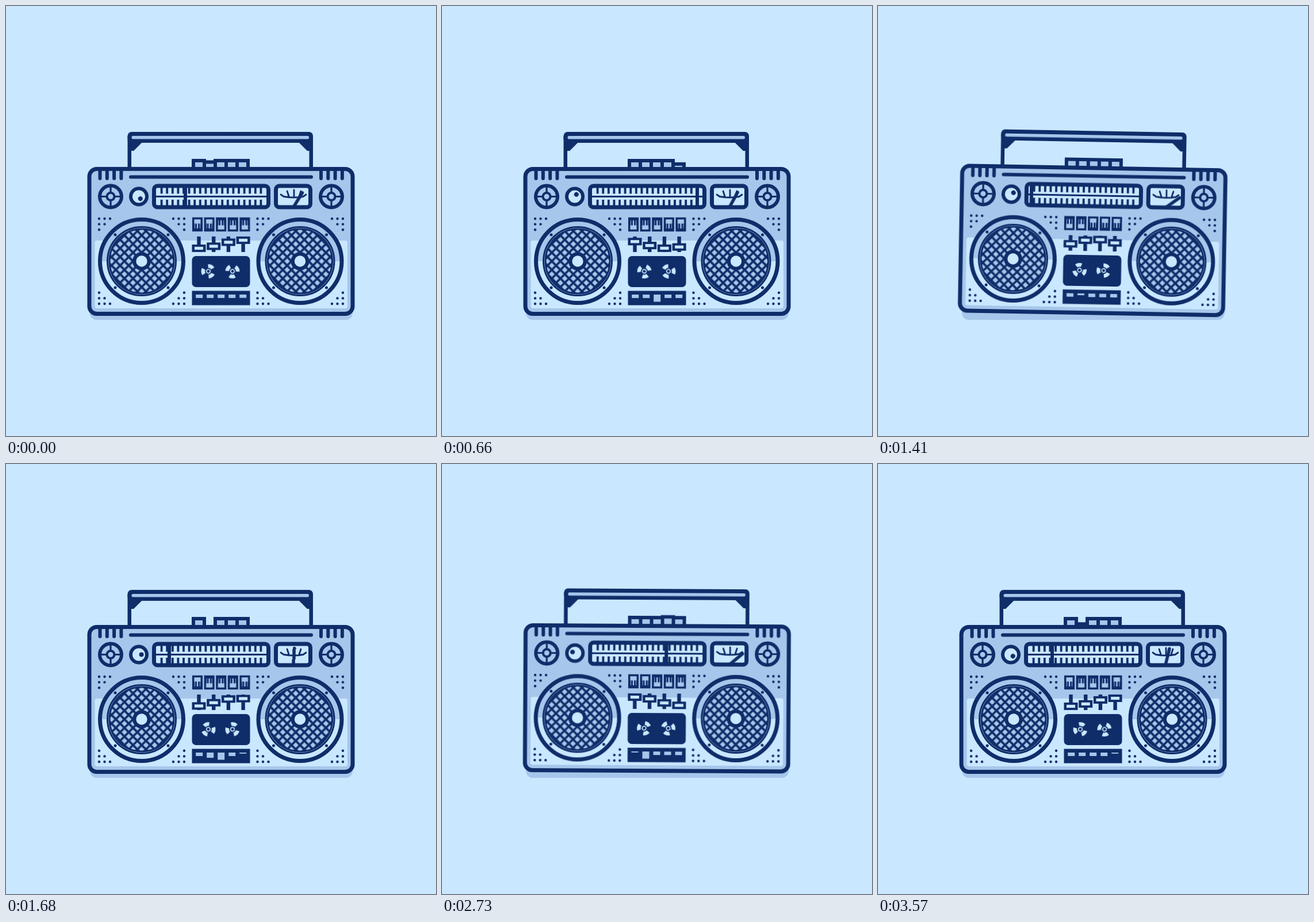
Animation of 748 by 748 pixels, one loop 3600 ms. Source, as an HTML page:

```html
<!DOCTYPE html>
<html lang="en">
<head>
<meta charset="utf-8">
<title>Boombox</title>
<style>
  html, body { margin: 0; width: 100%; height: 100%; overflow: hidden; background: #c9e7ff; }
  svg { display: block; width: 100vw; height: 100vh; }
  .dark { fill: #0f2d69; }
  .mid { fill: #a6c6eb; }
  .light { fill: #c9e7ff; }
  .line { stroke: #0f2d69; stroke-linecap: butt; }
  .none { fill: none; }
  .round { stroke-linecap: round; stroke-linejoin: round; }

  #box { transform-origin: 374px 378px; animation: wobble 450ms linear infinite; }
  @keyframes wobble {
    0%, 46.67%, 100% { transform: none; }
    6.67% { transform: translateY(-1.8px) rotate(.28deg); }
    16.67% { transform: translateY(-1.6px) rotate(1.35deg); }
    26.67% { transform: translateY(-1.6px) rotate(0deg); }
    36% { transform: translateY(-1.6px) rotate(-1.4deg); }
    40% { transform: translateY(-1.6px) rotate(-1.05deg); }
  }

  #meter { transform-origin: 500px 350px; animation: meter 450ms linear infinite; }
  @keyframes meter {
    0%, 100% { transform: rotate(31deg); }
    6.67% { transform: rotate(50deg); }
    14% { transform: rotate(54deg); }
    40% { transform: rotate(32deg); }
    46.67% { transform: rotate(29deg); }
    73.33% { transform: rotate(3deg); }
    93.33% { transform: rotate(13deg); }
  }

  .reel { animation: spin 900ms linear infinite; }
  @keyframes spin { to { transform: rotate(360deg); } }

  .comb { animation: flip 900ms step-end infinite; }
  @keyframes flip {
    0% { transform: none; }
    50%, 100% { transform: scaleY(-1); }
  }
</style>
</head>
<body>
<svg id="stage" viewBox="0 0 748 748" xmlns="http://www.w3.org/2000/svg">
  <defs>
    <pattern id="mesh" x="-5.3" y="-5.3" width="10.6" height="10.6" patternUnits="userSpaceOnUse" patternTransform="rotate(45)">
      <rect class="mid" width="10.6" height="10.6"/>
      <path class="line none" d="M0 5.3H10.6M5.3 0V10.6" stroke-width="3.7"/>
    </pattern>
    <clipPath id="meterClip"><rect x="471" y="314" width="57" height="35"/></clipPath>
  </defs>
  <rect class="mid" x="146" y="500" width="457" height="46" rx="12"/>
  <g id="box"></g>
</svg>
<script>
const LOOP = 3600;
const box = document.getElementById('box');

function add(tag, attrs, parent = box) {
  const el = document.createElementNS('http://www.w3.org/2000/svg', tag);
  for (const k in attrs) el.setAttribute(k, attrs[k]);
  return parent.appendChild(el);
}
const rect = (cls, x, y, width, height, rx = 0, w = 0, parent) =>
  add('rect', { class: cls, x, y, width, height, rx, 'stroke-width': w }, parent);
const disc = (cls, cx, cy, r, w = 0, parent) =>
  add('circle', { class: cls, cx, cy, r, 'stroke-width': w }, parent);
const path = (cls, d, w = 0, parent) =>
  add('path', { class: cls, d, 'stroke-width': w }, parent);
const group = (x, y, parent) => add('g', { transform: `translate(${x} ${y})` }, parent);
const times = (n, f) => Array.from({ length: n }, (_, i) => f(i));

// Parts behind the cabinet
const buttons = times(5, i => rect('mid line', 326 + 19 * i, 269, 19, 30, 0, 6));

path('dark', 'M211.5 226H218V286H211.5ZM527.5 226H534V286H527.5Z');
path('dark', 'M217 237H237L222 252H217ZM528.5 237H509L524 252H528.5Z');
rect('dark', 211.5, 219, 322.5, 19, 7);
rect('mid', 218.5, 226, 308.5, 5.5, 2.5);

// Cabinet
rect('mid', 145, 283.5, 458, 252, 13);
rect('light', 154.5, 408, 439.5, 118, 4);
rect('none line', 145, 283.5, 458, 252, 13, 7);
path('none line round', 'M217 297.5H531', 6);
for (const x of [163.5, 548]) {
  times(4, i => path('none line round', `M${x + 12.3 * i} 285V300`, 6));
}

// Corner dots; sx and sy point away from the corner
function dots(x, y, sx, sy) {
  for (let r = 0; r < 3; r++)
    for (let c = 0; c < 3 - r; c++)
      disc('dark', x + sx * c * 9.5, y + sy * r * 9.6, 2.2);
}
for (const [x, sx] of [[162, 1], [310, -1], [437.5, 1], [586, -1]]) {
  dots(x, 370, sx, 1);
  dots(x, 518, sx, -1);
}

function speaker(x) {
  const g = group(x, 444);
  disc('light', 0, 0, 72, 0, g);
  path('mid', 'M-72 0A72 72 0 0 1 72 0Z', 0, g);
  disc('none line', 0, 0, 72.5, 7, g);
  disc('mid line', 0, 0, 59.5, 3, g);
  add('circle', { r: 56, fill: 'url(#mesh)', class: 'line', 'stroke-width': 3 }, g);
  disc('dark', 0, 0, 16, 0, g);
  disc('light', 0, 0, 9.7, 0, g);
  for (const a of [-46, 46]) for (const b of [-46, 46]) disc('dark', a, b, 2.5, 0, g);
}
// The mesh has a crossing at the centre of each speaker
document.getElementById('mesh').setAttribute('patternTransform', 'rotate(45)');
[236, 511.5].forEach(speaker);

function dial(x) {
  const g = group(x, 331.5);
  disc('mid line', 0, 0, 19, 6, g);
  path('none line', 'M-18 0H18M0 -18V18', 3.2, g);
  disc('mid line', 0, 0, 6.5, 4, g);
}
[182, 566].forEach(dial);

const knob = group(231, 331.5);
disc('light line', 0, 0, 14, 6, knob);
const knobDot = disc('dark', 4.6, 0, 4, 0, knob);

// Tuner
rect('light line', 257.5, 313, 199, 37, 6, 7);
path('none line', 'M260 331.5H455', 3);
times(19, i => path('none line', `M${270.6 + 9.6 * i} 315V326.5m0 10.5V348`, 3.8));
const needle = rect('dark', -3, 314, 6, 35);

// Level meter
rect('light line', 469.5, 313, 60, 37, 6, 7);
path('none line round',
  'M478 328L483 331.5Q501 334.5 517 331.5L522 328M489 322L492 331M501 320V331M513 322L510 331', 2.8);
const meterBox = add('g', { 'clip-path': 'url(#meterClip)' });
const meter = path('none line round', 'M500 350V320.5', 5.5, meterBox);
meter.id = 'meter';

// Switches
times(5, i => {
  const g = group(333 + 20.6 * i, 380);
  rect('none line', -7.3, -10.5, 14.6, 21, 0, 3.5, g);
  const comb = path('none line', 'M-6 8.5H6M-2.6 9V-1.5M2.6 9V-1.5M-6.5 9V-1.5M6.5 9V-1.5', 3, g);
  comb.classList.add('comb');
  comb.style.animationDelay = `${150 * i - 1050}ms`;
});

// Sliders
const sliders = times(4, i => {
  const g = group(335.5 + 25.7 * i, 0);
  rect('dark', -3.2, 401, 6.4, 27, 0, 0, g);
  const cap = add('g', {}, g);
  rect('dark', -12, -6.5, 24, 13, 0, 0, cap);
  rect('light', -7.5, -2.6, 15, 5.2, 0, 0, cap);
  return cap;
});

// Cassette
rect('dark', 323.5, 435, 101, 54, 7);
for (const [x, angle] of [[352, 27], [394, 63]]) {
  const base = add('g', { transform: `translate(${x} 461.5) rotate(${angle})` });
  const reel = add('g', { class: 'reel' }, base);
  times(3, i => add('path', {
    class: 'light', d: 'M0 0L-6.2 -10.8A12.5 12.5 0 0 1 6.2 -10.8Z', transform: `rotate(${120 * i})`
  }, reel));
  disc('light line', 0, 0, 5, 2, reel);
  disc('dark', 0, 0, 2.4, 0, reel);
}

// Transport keys
rect('dark', 323.5, 495.5, 101, 25);
const keys = times(5, i => rect('mid', 330.2 + 19 * i, 502, 12, 6));

const buttonPresses = [
  [1, 90, 390], [5, 638, 840], [3, 990, 1290], [2, 1440, 1740],
  [4, 1890, 2190], [4, 2340, 2640], [1, 2790, 3090], [2, 3240, 3540]
];
const keyPresses = [
  [1, 120, 260], [4, 330, 470], [3, 560, 700], [1, 800, 900], [5, 1000, 1120],
  [2, 1220, 1340], [5, 1480, 1620], [3, 1580, 1800], [2, 1652, 1860], [5, 2060, 2200],
  [1, 2400, 2670], [2, 2640, 2840], [4, 2980, 3120], [5, 3380, 3510]
];
const tuning = [
  [0, 312], [330, 435], [530, 449], [660, 444], [930, 390],
  [1080, 312], [1380, 267], [1680, 284], [1770, 303]
];

// Piecewise linear value through [time, value] points
function ramp(t, pts) {
  let i = 1;
  while (i < pts.length - 1 && t > pts[i][0]) i++;
  const [a, va] = pts[i - 1], [b, vb] = pts[i];
  return va + (vb - va) * Math.min(1, Math.max(0, (t - a) / (b - a)));
}

// Sum of all presses of one part: down, hold, and release past rest
function pressed(list, id, t, depth, over, back) {
  let sum = 0;
  for (const [n, from, to] of list) {
    if (n !== id) continue;
    const x = (t - from + LOOP) % LOOP, len = to - from;
    sum += ramp(x, [[0, 0], [60, depth], [len, depth], [len + back, -over], [len + back + 32, 0]]);
  }
  return sum;
}

// Smooth periodic curve through points
function curve(t, pts, period) {
  const n = pts.length;
  const at = i => {
    const k = ((i % n) + n) % n;
    return [pts[k][0] + period * Math.floor(i / n), pts[k][1]];
  };
  let i = 0;
  while (i < n - 1 && t >= pts[i + 1][0]) i++;
  const slope = j => (at(j + 1)[1] - at(j - 1)[1]) / (at(j + 1)[0] - at(j - 1)[0]);
  const [a, va] = at(i), [b, vb] = at(i + 1), h = b - a, u = (t - a) / h;
  return va * (1 + 2 * u) * (1 - u) ** 2 + slope(i) * h * u * (1 - u) ** 2
    + vb * u * u * (3 - 2 * u) + slope(i + 1) * h * u * u * (u - 1);
}

function draw(t) {
  buttons.forEach((b, i) => b.setAttribute('y', 269 + pressed(buttonPresses, i + 1, t, 16, 2, 80)));
  keys.forEach((k, i) => k.setAttribute('height', 6 + pressed(keyPresses, i + 1, t, 6.5, 4.2, 60)));

  const x = curve(t % 1800, tuning, 1800);
  needle.setAttribute('transform', `translate(${x} 0)`);
  knobDot.setAttribute('transform', `rotate(${(x - 284) * 1.92})`);

  sliders.forEach((s, i) => {
    const y = 414.5 + 7 * Math.cos((t - 300 * i) * 2 * Math.PI / 1800);
    s.setAttribute('transform', `translate(0 ${y})`);
  });
}

let start;
function tick(now) {
  start ??= now;
  draw((now - start) % LOOP);
  requestAnimationFrame(tick);
}
draw(0);
requestAnimationFrame(tick);
</script>
</body>
</html>
```
